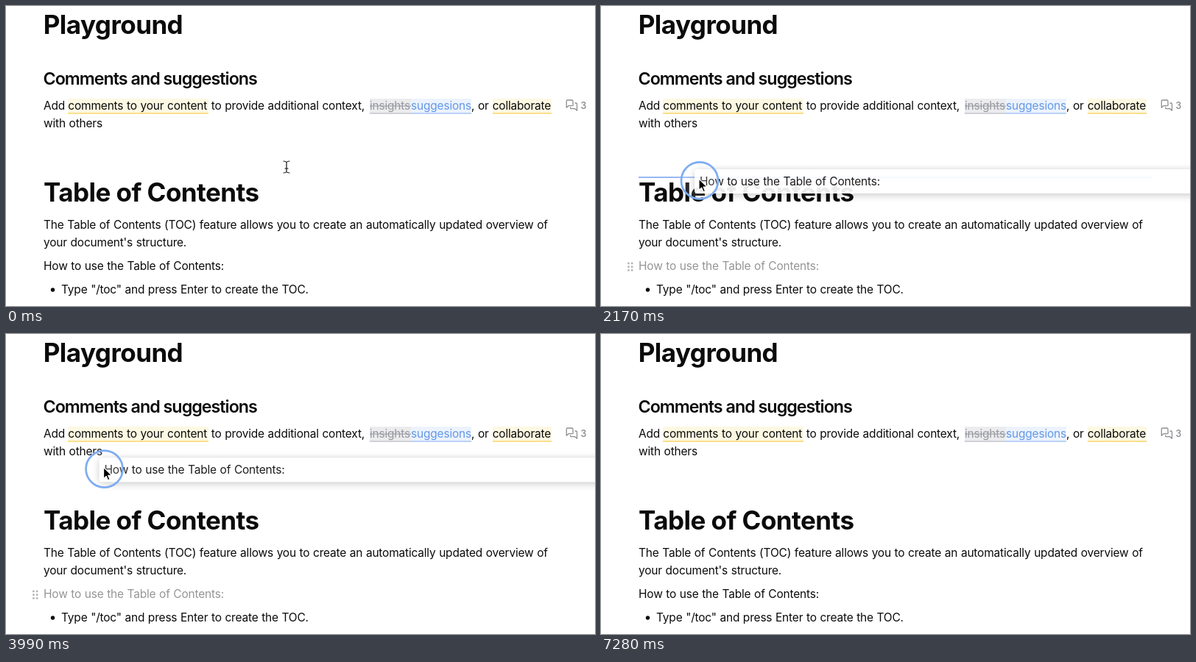
An HTML page that plays this animation: 800 px wide and 408 px high, repeating every 7.56 s.

```html
<!DOCTYPE html>
<html lang="en">
<head>
<meta charset="utf-8">
<title>Playground</title>
<style>
  html, body { margin: 0; width: 100%; height: 100%; overflow: hidden; background: #fff; }
  svg { display: block; width: 800px; height: 408px; }
  text {
    font: 400 15.5px Inter, "Liberation Sans", sans-serif;
    font-optical-sizing: none;
    letter-spacing: -.2px;
    word-spacing: .5px;
    fill: #0b0b0c;
    white-space: pre;
  }
  .h1 { font-size: 35px; font-weight: 700; letter-spacing: -.55px; word-spacing: 0; }
  .h2 { font-size: 23.3px; font-weight: 600; letter-spacing: -1px; word-spacing: 0; }
  .removed { fill: #9799a0; }
  .added { fill: #6298ea; }
  .count { font-size: 12.5px; font-weight: 500; fill: #85868a; }
  .icon { fill: none; stroke: #8d8e92; stroke-width: 1.3; stroke-linejoin: round; stroke-linecap: round; }
  .card { filter: drop-shadow(0 0 4px rgba(0, 0, 0, .1)) drop-shadow(0 3px 6px rgba(0, 0, 0, .16)); }
  .cursor { stroke-linejoin: round; stroke-linecap: round; }
</style>
</head>
<body>
<svg viewBox="0 0 800 408">
  <defs>
    <path id="beamShape" fill="none" d="M-4-8q3 0 4 1.5q1-1.5 4-1.5M-4 8q3 0 4-1.5q1 1.5 4 1.5M0-6.5v13M-2 2h4"/>
  </defs>

  <text class="h1" x="50.7" y="38.3">Playground</text>
  <text class="h2" x="50.5" y="107">Comments and suggestions</text>

  <g>
    <path fill="#fdf8e2" d="M84 126h191v19H84zM661 126h80v19h-80z"/>
    <path fill="#f9e08a" d="M84 145h191v2H84zM661 145h80v2h-80z"/>
    <path fill="#ececee" d="M494 126h56v19h-56z"/>
    <path fill="#cfd1d6" d="M494 145h56v2h-56z"/>
    <path fill="#edf3fc" d="M550 126h82v19h-82z"/>
    <path fill="#b9d3f8" d="M550 145h82v2h-82z"/>
    <text x="51" y="141">Add</text>
    <text x="84.3" y="141">comments to your content</text>
    <text x="278.8" y="141">to provide additional context,</text>
    <text class="removed" x="494" y="141">insights</text>
    <path stroke="#9799a0" stroke-width="1.1" d="M494 136h56"/>
    <text class="added" x="550" y="141">suggesions</text>
    <text x="632" y="141">, or</text>
    <text x="660.7" y="141">collaborate</text>
    <text x="51" y="165">with others</text>
    <path class="icon" d="M770 130.5v-1.3q0-1.2-1.2-1.2h-6.3q-1.2 0-1.2 1.2v9l2.7-2.5h5q1.2 0 1.2-1.2zM773 132h1.3q1.2 0 1.2 1.2v9l-2.7-2.5h-5q-1.2 0-1.2-1.2v-.6"/>
    <text class="count" x="780.5" y="139.7">3</text>
  </g>

  <text class="h1" x="51" y="266.3">Table of Contents</text>
  <text x="51" y="303">The Table of Contents (TOC) feature allows you to create an automatically updated overview of</text>
  <text x="51" y="327">your document's structure.</text>
  <text id="block" x="51" y="359">How to use the Table of Contents:</text>
  <circle cx="63.5" cy="386" r="2.7" fill="#0b0b0c"/>
  <text x="75" y="391">Type "/toc" and press Enter to create the TOC.</text>

  <g id="grip" fill="#6c6d71"></g>
  <path id="dropLine" stroke="#97b9f3" stroke-width="2" d="M51 0h697"/>

  <g id="preview">
    <rect class="card" x="-7" y="-16" width="706" height="33" rx="4" fill="#fff"/>
    <text x="0" y="5.7">How to use the Table of Contents:</text>
  </g>

  <circle id="ring" cy="-.6" r="25" fill="#fff" fill-opacity=".12" stroke="#7eacf1" stroke-width="2.7"/>

  <g id="beam" class="cursor">
    <use href="#beamShape" stroke="#fff" stroke-width="3"/>
    <use href="#beamShape" stroke="#111" stroke-width="1.2"/>
  </g>
  <g id="arrow" class="cursor">
    <path fill="#000" stroke="#fff" stroke-width="1.2" d="M-1-3v15.5l3.6-3.4 2.4 5.6 2.5-1.1-2.4-5.5h5z"/>
  </g>
  <g id="hand" class="cursor">
    <path transform="translate(1 7) rotate(-9)" fill="#fff" stroke="#111" stroke-width="1.1" d="M-2 1.5V-6.5a1.4 1.4 0 0 1 2.8 0V-1.5q1.3-1 2.4.2q1.2-.8 2.2.4q1.4-.5 1.8.9V3.5q0 2-1.2 3.2V8.5H-1.5V7L-5.8 2.2q-1-1.6.6-2.2q1.2-.1 3.2 1.5zM1 3v3M3 3v3M5 3v3"/>
  </g>
</svg>

<script>
const LOOP = 7560, STEP = 70;
const PRESS = 1400, LIFT = 1540, RELEASE = 5180, RETURN = 5530, LANDED = 5890, DONE = 6090, GONE = 6370;

// time, x, y of the pointer
const path = [
  [0, 381, 219], [280, 376, 222], [420, 376, 222], [1120, 61, 350], [1190, 54, 354],
  [1330, 40, 355], [1470, 40, 354], [1610, 52, 342], [1960, 122, 268], [2170, 134, 238],
  [2520, 136, 230], [2870, 137, 212], [3290, 138, 180.5], [3640, 138, 177], [4270, 130, 190],
  [4690, 125, 200.5], [6020, 125, 200.5], [6230, 133, 203], [6300, 187, 226], [LOOP, 187, 226]
];

const $ = id => document.getElementById(id);
const clamp = v => Math.max(0, Math.min(1, v));
const ease = p => (1 - Math.cos(Math.PI * clamp(p))) / 2;
const mix = (a, b, p) => a + (b - a) * p;
const show = (id, on) => { $(id).style.display = on ? "" : "none"; };
const place = (id, x, y) => $(id).setAttribute("transform", `translate(${x} ${y})`);

for (let i = 0; i < 6; i++) {
  const dot = document.createElementNS("http://www.w3.org/2000/svg", "circle");
  dot.setAttribute("cx", 37.4 + (i % 2) * 4.7);
  dot.setAttribute("cy", 350 + (i >> 1) * 4.7);
  dot.setAttribute("r", 1.45);
  $("grip").append(dot);
}

function pointer(t) {
  const i = path.findIndex((k, n) => n > 0 && t < k[0]);
  const [t0, x0, y0] = path[i - 1], [t1, x1, y1] = path[i];
  const p = (t - t0) / (t1 - t0);
  const q = t1 - t0 === 700 ? ease(p) : p;
  return [mix(x0, x1, q), mix(y0, y1, q)];
}

function cursorAt(t) {
  if (t >= GONE) return "";
  if (t >= PRESS && t < RELEASE) return "arrow";
  return t >= 1260 && t < DONE ? "hand" : "beam";
}

function render(t) {
  const [x, y] = pointer(t);
  const held = t >= LIFT && t < RELEASE;
  const lifted = t >= LIFT && t < DONE;

  const kind = cursorAt(t);
  for (const id of ["beam", "arrow", "hand"]) {
    show(id, id === kind);
    place(id, x, y);
  }

  show("ring", t >= PRESS && t < RELEASE);
  place("ring", x, y);

  const back = ease((t - RETURN) / (LANDED - RETURN));
  show("preview", lifted);
  place("preview", mix(x, 61.5, back), mix(y, 353, back));
  $("preview").style.opacity = .92 * (1 - clamp((t - LANDED) / (DONE - LANDED)));

  $("block").style.opacity = lifted ? .43 : 1;
  show("grip", t >= 1050 && t < DONE);
  $("grip").style.opacity = lifted ? .5 : 1;

  show("dropLine", held && y > 222 && y < 310);
  place("dropLine", 0, y < 254 ? 233 : 283);
}

const start = performance.now();
function tick() {
  const t = (performance.now() - start) % LOOP;
  render(Math.floor(t / STEP) * STEP);
  requestAnimationFrame(tick);
}
tick();
</script>
</body>
</html>
```
